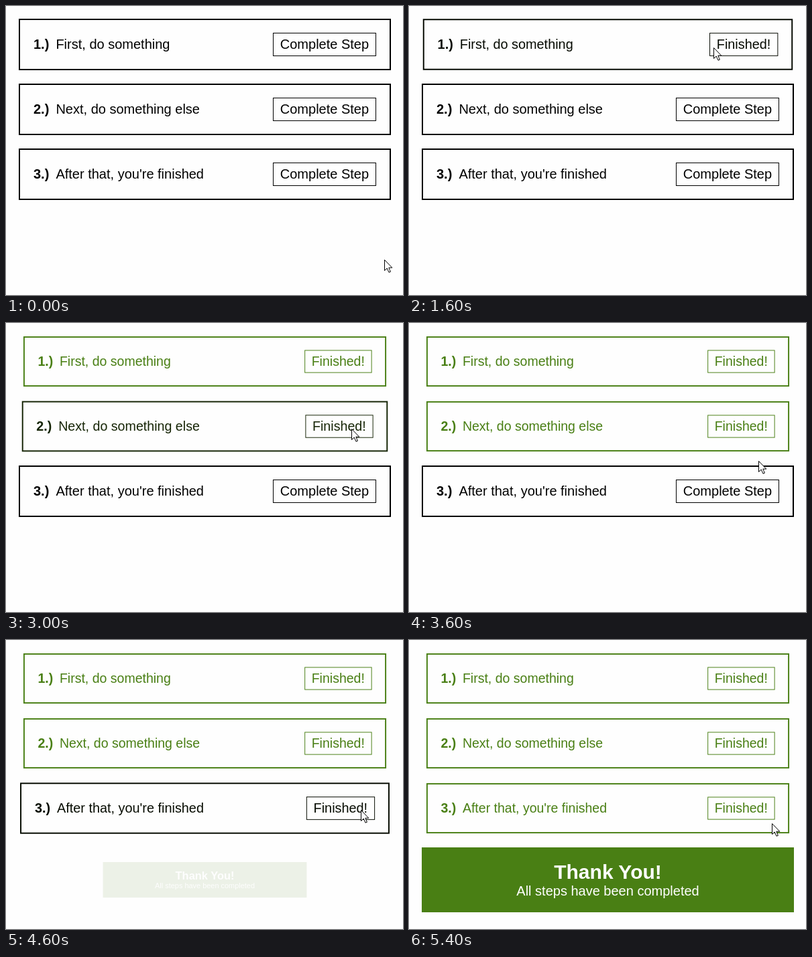
Write an HTML page that moves like this. It is 592x432 px and loops after 5600 ms.

```html
<!DOCTYPE html>
<html lang="en">
<head>
<meta charset="utf-8">
<title>Steps</title>
<style>
  html, body { margin: 0; width: 100%; height: 100%; overflow: hidden; background: #fefefe; }
  svg { display: block; width: 592px; height: 432px; font: 20px "Liberation Sans", Arial, sans-serif; }
  .bold { font-weight: bold; }
</style>
</head>
<body>
<svg id="stage" viewBox="0 0 592 432"></svg>
<script>
const LOOP = 5600, TICK = 200;
const CENTER_X = 296.5, BANNER_Y = 358.5;
const SHRINK_MS = 110, FADE_MS = 220;
const GREEN = [73, 127, 20];

const steps = [
  { label: "First, do something", y: 57.5, click: 1580 },
  { label: "Next, do something else", y: 154.5, click: 2956 },
  { label: "After that, you're finished", y: 251.5, click: 4578 }
];

// Cursor path: time, x, y
const path = [
  [0, 564, 378.5], [1200, 454, 62], [1600, 454, 62], [2200, 512, 131],
  [2500, 515, 158], [3000, 515, 158], [3600, 521, 206], [4100, 529, 254],
  [4700, 529, 254], [5400, 541, 274], [5600, 541, 274]
];

const clamp = v => Math.min(1, Math.max(0, v));
const mix = (a, b, p) => a + (b - a) * p;
const smooth = p => p * p * (3 - 2 * p);

// The CSS "ease" curve, cubic-bezier(.25, .1, .25, 1)
function ease(x) {
  if (x <= 0 || x >= 1) return clamp(x);
  const bezier = (a, b, s) => 3 * a * s * (1 - s) ** 2 + 3 * b * s * s * (1 - s) + s ** 3;
  let low = 0, high = 1;
  for (let i = 0; i < 24; i++) {
    const mid = (low + high) / 2;
    if (bezier(.25, .25, mid) < x) low = mid; else high = mid;
  }
  return bezier(.1, 1, low);
}

const scaleAt = (x, y, s) => `translate(${x} ${y}) scale(${s}) translate(${-x} ${-y})`;

const cardMarkup = ({ label, y }, i) => `
  <g class="card">
    <rect x="20" y="${y - 37.5}" width="553" height="75" fill="none" stroke="currentColor" stroke-width="2"/>
    <g fill="currentColor">
      <text class="bold" x="41" y="${y + 6.5}">${i + 1}.)</text>
      <text x="74.4" y="${y + 6.5}">${label}</text>
      <text class="action" y="${y + 6.5}"></text>
    </g>
    <rect class="button" y="${y - 17}" height="34" fill="none" stroke="currentColor"/>
  </g>`;

const stage = document.getElementById("stage");
stage.innerHTML = steps.map(cardMarkup).join("") + `
  <g id="banner" fill="#fff" text-anchor="middle">
    <rect x="19" y="310" width="555" height="97" fill="rgb(${GREEN})"/>
    <text class="bold" x="${CENTER_X}" y="357" font-size="30">Thank You!</text>
    <text x="${CENTER_X}" y="382">All steps have been completed</text>
  </g>
  <path id="cursor" d="M.5 .5V16.5L4.2 13L7 19.2L9.4 18.2L6.8 12.2H11.8Z" fill="#fff" stroke="#000"/>`;

const cards = [...stage.querySelectorAll(".card")];
const banner = document.getElementById("banner");
const cursor = document.getElementById("cursor");

function drawCard(card, { y, click }, t) {
  const done = t >= click;
  const shrink = ease((t - click) / SHRINK_MS);
  const tint = ease((t - click) / FADE_MS);
  const left = done ? 449 : 398;
  const action = card.querySelector(".action");
  const button = card.querySelector(".button");
  card.setAttribute("transform", scaleAt(CENTER_X, y, mix(1, .975, shrink)));
  card.setAttribute("color", `rgb(${GREEN.map(c => Math.round(c * tint))})`);
  action.textContent = done ? "Finished!" : "Complete Step";
  action.setAttribute("x", left + 10.8);
  button.setAttribute("x", left + .5);
  button.setAttribute("width", 551.5 - left - .5);
}

function drawCursor(t) {
  const i = path.findIndex(point => point[0] > t);
  const [t0, x0, y0] = path[i - 1], [t1, x1, y1] = path[i];
  const p = smooth((t - t0) / (t1 - t0));
  cursor.setAttribute("transform", `translate(${Math.round(mix(x0, x1, p))} ${Math.round(mix(y0, y1, p))})`);
}

function render(time) {
  const t = Math.floor((time % LOOP) / TICK) * TICK;
  steps.forEach((step, i) => drawCard(cards[i], step, t));
  const shown = ease((t - steps[2].click) / FADE_MS);
  banner.setAttribute("opacity", shown);
  banner.setAttribute("transform", scaleAt(CENTER_X, BANNER_Y, mix(.5, 1, shown)));
  drawCursor(t);
}

function loop(now) {
  render(now);
  requestAnimationFrame(loop);
}
render(0);
requestAnimationFrame(loop);
</script>
</body>
</html>
```
